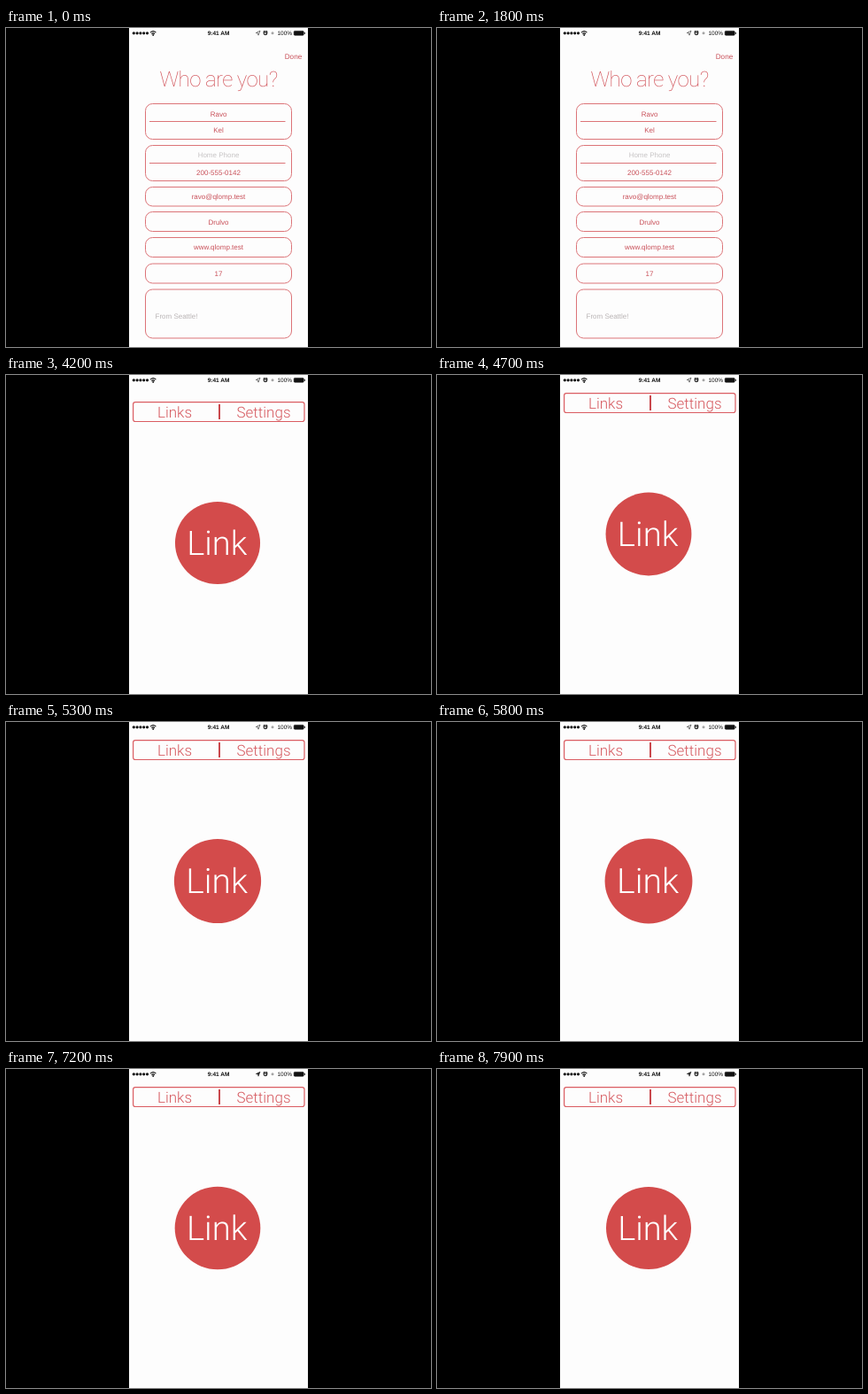
Recreate the animation shown at these times as an HTML page. Size 480 px wide and 360 px high, loop 8000 ms.

```html
<!DOCTYPE html>
<html lang="en">
<head>
<meta charset="utf-8">
<title>Profile form and link button</title>
<style>
  html, body { margin: 0; width: 100%; height: 100%; overflow: hidden; background: #000; }
  svg { display: block; width: 100vw; height: 100vh; }
  text { text-rendering: geometricPrecision; text-anchor: middle; font-family: "Liberation Sans", Arial, sans-serif; }
  .small { font-size: 8px; fill: #c9515a; }
  .hint { fill: #c6c3c4; }
  .thin { font-family: Roboto, Inter, sans-serif; font-weight: 300; fill: #d65a60; }
  .line { fill: none; stroke: #dc7478; }
  .bar text { font-size: 6.5px; fill: #111; }
</style>
</head>
<body>
<svg viewBox="0 0 480 360">
  <clipPath id="screen"><rect x="139" width="202" height="360"/></clipPath>
  <g clip-path="url(#screen)">
    <rect x="139" width="202" height="360" fill="#fdfdfd"/>

    <g id="home">
      <rect x="143.6" y="20.6" width="193.4" height="21.9" rx="2.5" fill="none" stroke="#da5c61" stroke-width="1.2"/>
      <path d="M241 23V40" stroke="#c9484d" stroke-width="2"/>
      <text class="thin" x="190.5" y="38" font-size="17">Links</text>
      <text class="thin" x="291" y="38" font-size="17">Settings</text>
      <g id="button">
        <ellipse rx="48" ry="46.5" fill="#d34b4b"/>
        <text class="thin" x="-.8" y="13.5" font-size="38" style="fill:#fff">Link</text>
        <ellipse id="shade" rx="48" ry="46.5" opacity=".47"/>
      </g>
    </g>

    <g id="form">
      <rect x="139" width="202" height="360" fill="#fdfdfd"/>
      <text id="done" class="small" x="324.5" y="35" style="font-size:8.2px">Done</text>
      <text class="thin" x="240" y="65.5" font-size="24" letter-spacing="-.6" style="font-weight:100;fill:#cf4a51">Who are you?</text>
      <g id="fields"></g>
    </g>

    <g class="bar">
      <g id="dots"></g>
      <g fill="none" stroke="#111" stroke-width="1.1">
        <path d="M163 5.2Q166.200 2.200 169.400 5.200M164.400 6.800Q166.200 5.100 168 6.800"/>
        <circle cx="166.200" cy="8" r=".4"/>
      </g>
      <text x="240" y="8" font-weight="bold">9:41 AM</text>
      <path id="arrow" d="M287 3.200L282.300 5.500L284.500 5.900L285 8.200Z" stroke="#222" stroke-width=".6"/>
      <circle cx="293" cy="5.800" r="1.900" fill="none" stroke="#111" stroke-width="1.100"/>
      <path d="M290.500 4.200L291.800 3M295.500 4.200L294.200 3M293 4.800V6H294" fill="none" stroke="#111" stroke-width=".8"/>
      <circle cx="301" cy="5.800" r="1.500" fill="#a5a5a5"/>
      <text x="314.800" y="8">100%</text>
      <rect x="325.200" y="3.400" width="11" height="4.800" rx="1" fill="#111" stroke="#111" stroke-width=".6"/>
      <path d="M337.300 4.800V6.900" stroke="#111"/>
    </g>
  </g>
</svg>
<script>
const $ = id => document.getElementById(id);
const LOOP = 8000, STEP = 100;

const box = (top, bottom) =>
  `<rect class="line" x="157.500" y="${top}" width="165" height="${bottom - top}" rx="8"/>`;
const rule = y => `<path class="line" d="M162 ${y}H315.500"/>`;
const label = (text, y, cls = '') => `<text class="small ${cls}" x="240" y="${y}">${text}</text>`;

$('fields').innerHTML =
  box(85.5, 125.5) + rule(105.5) + label('Ravo', 100.3) + label('Kel', 118.3) +
  box(132.5, 172.5) + rule(152.5) + label('Home Phone', 145.8, 'hint') + label('200-555-0142', 166) +
  box(179.5, 201) + label('ravo@qlomp.test', 193.2) +
  box(207.5, 229.5) + label('Drulvo', 221.8) +
  box(236.5, 258.5) + label('www.qlomp.test', 250.3) +
  box(266, 288) + label('17', 280) +
  box(295, 350) +
  '<text class="small" x="168.500" y="328" style="text-anchor:start;fill:#b9b4b5">From Seattle!</text>';

$('dots').innerHTML = [0, 1, 2, 3, 4]
  .map(i => `<circle cx="${144.3 + i * 3.8}" cy="5.800" r="1.600" fill="#111"/>`).join('');

const between = (t, a, b) => t >= a && t < b;

function draw(t) {
  // The form slides down while the home screen waits below the status bar.
  const slide = Math.min(1, Math.max(0, (t - 3900) / 400));
  $('form').setAttribute('transform', `translate(0 ${360 * (1 - (1 - slide) ** 3)})`);
  $('done').setAttribute('opacity', between(t, 3700, 4400) ? .3 : 1);
  $('home').setAttribute('transform', `translate(0 ${t < 4400 ? 10 : 0})`);

  // One slow swell of the button.
  const phase = Math.min(1, Math.abs(t - 5900) / 1900);
  const scale = 1 + .015 * (1 + Math.cos(Math.PI * phase));
  $('button').setAttribute('transform', `translate(239 179.500) scale(${scale})`);
  $('shade').style.display = between(t, 6400, 6800) ? '' : 'none';
  $('arrow').setAttribute('fill', t >= 7000 ? '#222' : 'none');
}

const start = performance.now();
function tick() {
  const t = (performance.now() - start) % LOOP;
  draw(Math.floor(t / STEP) * STEP);
  requestAnimationFrame(tick);
}
tick();
</script>
</body>
</html>
```
